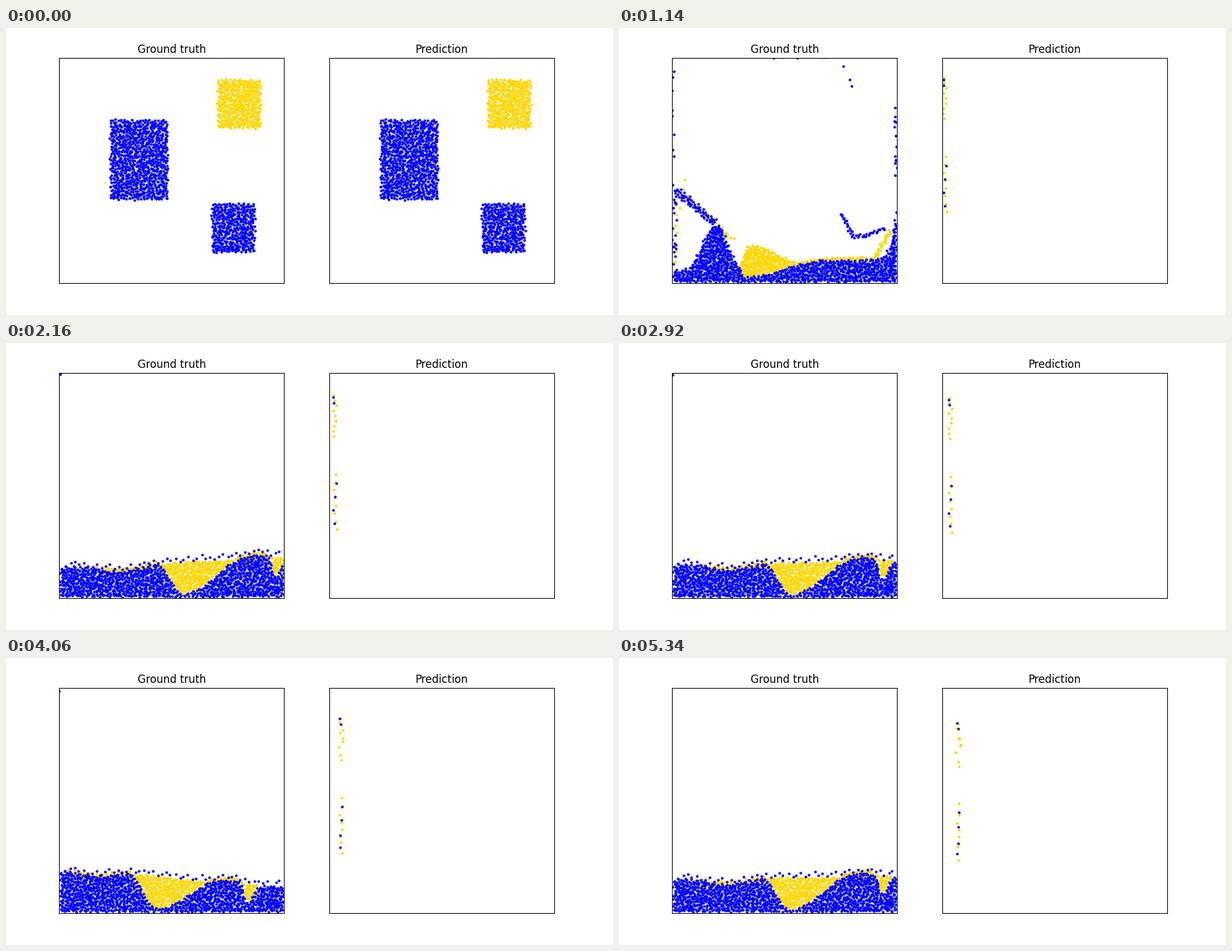
A matplotlib script for the animation above (5380 ms loop, 950 by 450 pixels).

```python
import numpy as np
import matplotlib.pyplot as plt
from matplotlib.animation import FuncAnimation

W, H, DPI = 950, 450, 100
FRAMES, LOOP = 151, 5380
PHI = (5 ** 0.5 - 1) / 2
SIDE, GAP = 352.27, 422.73
LEFT, BOTTOM = 83.0, 50.36
X0, X1, FLOOR = 85, 434, 398


def hump(d, left, right):
    """Raised cosine, 1 at d = 0, with its own reach on each side."""
    r = np.clip(np.where(d < 0, d / left, d / right), -1, 1)
    return 0.5 + 0.5 * np.cos(np.pi * r)


# Shapes map unit coordinates (u, v) to stage pixels, y pointing down.

def pool(x0, x1, top, bottom=FLOOR):
    """Even fill between two levels, each a number or a function of x."""
    def level(y, x):
        return y(x) if callable(y) else np.full_like(x, y)

    grid = np.linspace(x0, x1, 300)
    area = np.cumsum(np.maximum(level(bottom, grid) - level(top, grid), 0.1))
    area -= area[0]

    def shape(u, v):
        x = np.interp(u * area[-1], area, grid)
        a, b = level(top, x), level(bottom, x)
        return np.column_stack([x, a + (b - a) * v])
    return shape


def ribbon(width, *points, clumps=0):
    """Band along a polyline, optionally bunched into clumps."""
    p = np.array(points, float)
    step = np.diff(p, axis=0)
    size = np.hypot(*step.T)
    s = np.concatenate([[0], np.cumsum(size)])

    def shape(u, v):
        if clumps:
            w = 2 * np.pi * clumps
            u = u + 0.9 * np.sin(w * u) / w
        d = u * s[-1]
        k = np.clip(np.searchsorted(s, d) - 1, 0, len(size) - 1)
        normal = np.column_stack([-step[k, 1], step[k, 0]]) / size[k, None]
        mid = np.column_stack([np.interp(d, s, p[:, 0]), np.interp(d, s, p[:, 1])])
        return mid + normal * ((v - 0.5) * width)[:, None]
    return shape


def layout(*parts):
    """Spread consecutive runs of particles over (count, shape) parts."""
    out, i = [], 0
    for n, shape in parts:
        k = np.arange(i, i + n)
        out.append(shape((k - i + 0.5) / n, k * PHI % 1))
        i += n
    return np.vstack(out) + np.random.default_rng(5).uniform(-1.5, 1.5, (i, 2))


def track(times, keys):
    """Smooth interpolation through key poses without overshoot."""
    t, p = np.array(times, float), np.stack(keys)
    d = np.diff(p, axis=0) / np.diff(t)[:, None, None]
    prod, total = d[:-1] * d[1:], d[:-1] + d[1:]
    same = prod > 0
    inner = np.where(same, 2 * prod / np.where(same, total, 1), 0)
    m = np.concatenate([d[:1], inner, d[-1:]])

    def at(f):
        k = min(np.searchsorted(t, f, "right") - 1, len(t) - 2)
        h = t[k + 1] - t[k]
        s = (f - t[k]) / h
        return ((1 + 2 * s) * (1 - s) ** 2 * p[k] + s * (1 - s) ** 2 * h * m[k]
                + s * s * (3 - 2 * s) * p[k + 1] + s * s * (s - 1) * h * m[k + 1])
    return at


# Ground truth: three falling blocks, a splash, then slow sloshing.

blue_start = layout((900, pool(163, 253, 144, 269)), (420, pool(322, 389, 275, 352)))
gold_start = layout((430, pool(331, 398, 81, 157)))


def blue_impact():
    surface = lambda x: FLOOR - 10 - 140 * ((x - 325) / 109) ** 3
    return layout((900, pool(90, 184, 212, 342)),
                  (360, pool(325, X1, surface)),
                  (60, ribbon(5, (432, 290), (433, 140))))


def blue_climb():
    left = lambda x: FLOOR - 218 * np.exp((X0 - x) / 42)
    right = lambda x: FLOOR - 5 - 70 * ((x - 208) / 226) ** 6
    return layout((14, ribbon(2, (85, 60), (86, 190))),
                  (800, pool(X0, 198, left)),
                  (76, ribbon(14, (192, 388), (212, 375), (250, 336))),
                  (10, ribbon(5, (238, 332), (227, 296), (222, 284))),
                  (340, pool(208, X1, right)),
                  (70, ribbon(5, (432, 335), (433, 75), clumps=6)),
                  (10, ribbon(1, (428, 48), (300, 47), clumps=3)))


def splash_bed(x):
    s = np.clip((x - 200) / 120, 0, 1)
    return FLOOR - 8 - 26 * s * s * (3 - 2 * s) - 80 * np.exp((x - X1) / 8)


def blue_splash():
    mound = lambda x: FLOOR - 18 - 72 * hump(x - 152, 65, 55) ** 2
    return layout((8, ribbon(2, (84, 49), (85, 218), clumps=3)),
                  (22, ribbon(6, (87, 240), (87, 375), clumps=2)),
                  (60, ribbon(11, (88, 254), (110, 272), (150, 306))),
                  (520, pool(X0, 192, mound)),
                  (648, pool(192, X1, splash_bed)),
                  (40, ribbon(5, (347, 290), (366, 327), (388, 325), (416, 313))),
                  (14, ribbon(3, (433, 240), (433, 116), clumps=2)),
                  (8, ribbon(3, (371, 112), (348, 47), (222, 47), clumps=3)))


def gold_splat():
    lens = lambda x: 32 * np.sqrt(np.maximum(1 - ((x - 215) / 70) ** 2, 0))
    return layout((430, pool(145, 285, lambda x: 362 - lens(x), lambda x: 362 + lens(x))))


def gold_splash():
    top = lambda x: splash_bed(x) - 48 * hump(x - 205, 28, 90)
    return layout((10, ribbon(5, (89, 372), (90, 300), (103, 232))),
                  (25, ribbon(6, (105, 264), (145, 298), (178, 334))),
                  (310, pool(178, 292, top, splash_bed)),
                  (85, ribbon(6, (285, 369), (320, 363), (400, 361), (424, 318))))


def settled(f):
    """Blue and gold poses of the sloshing bed."""
    tilt = 10.2 * np.cos(2 * np.pi * (f - 66) / 100) - 3
    c = 252 + 2.2 * tilt + 12

    def surface(x):
        return (345 + tilt * np.cos(np.pi * (x - LEFT) / SIDE)
                + 8 * hump(x - c + 100, 70, 70) - 6 * hump(x - c - 115, 50, 50))

    pocket = lambda x: surface(x) + 50 * hump(x - c, 45, 95)
    dent = lambda x: surface(x) + 30 * hump(x - c - 142, 12, 20)
    bed = lambda x: pocket(x) + dent(x) - surface(x)
    above = lambda dy: lambda x: surface(x) - dy

    corner = (84 - (f - 61) * 0.04, 48 + (f - 61) * 0.05)
    blue = layout((1, ribbon(0, corner, (corner[0], corner[1] + 1))),
                  (1269, pool(X0, X1, bed)),
                  (50, pool(90, 432, above(9), above(1))))
    gold = layout((50, pool(max(90, c - 140), c - 40, above(4), above(-3))),
                  (310, pool(c - 45, c + 92, surface, pocket)),
                  (30, pool(c + 85, c + 130, above(4), above(-3))),
                  (40, pool(c + 130, c + 161, surface, dent)))
    return blue, gold


flight = [0, 6, 11, 16, 20]
calm = [61, 82, 98, 114, 132, 150]
blue_calm, gold_calm = zip(*map(settled, calm))
gold_flight = [gold_start + (-6.7 * f, 0.6 * f * f - 1.1 * f) for f in flight]

# Prediction: blocks fly out, a few particles linger at the left wall.


def gold_fly(dx):
    q = gold_start - (364.5, 119)
    taper = 1.55 - 0.5 * np.clip(q[:, 1] / 39, 0, 1) ** 3
    return np.column_stack([616 + dx + q[:, 0] * taper, 92 + q[:, 1] * 1.55])


def blue_fly(dx, wall):
    return layout((847, pool(370 - dx, 500 - dx, -30, 150)),
                  (45, ribbon(5, (509 - dx, 22), (508 - dx, 130))),
                  (8, ribbon(2, (507 - dx, 130), (507 - dx, 275))),
                  (42, ribbon(8, (853 + wall, 48), (856 + wall, 285), clumps=4)),
                  (378, pool(865 + dx, 935 + dx, 40, 280)))


def linger(keys, picks, y, seed):
    """Add later poses where the picked particles drift off the wall."""
    rng = np.random.default_rng(seed)
    early, mid, late = (keys[-1].copy() for _ in range(3))
    n = len(picks)
    mid[picks] = np.column_stack([rng.uniform(512, 518, n), y])
    early[picks] = mid[picks] - (5, 4)
    late[picks] = mid[picks] + rng.uniform((13, 15), (20, 30), (n, 2))
    return track((0, 16, 32, 61, 150), [*keys[:-1], early, mid, late])


shift = (GAP, 0)
gold_y = [*np.linspace(82, 146, 9), *np.linspace(206, 292, 8)]
blue_y = [*np.linspace(85, 94, 2), *np.linspace(220, 283, 4)]
tracks = [
    track([*flight, 24, 32, *calm], [*gold_flight, gold_splat(), gold_splash(), *gold_calm]),
    track([0, 8, 16, 32, *calm],
          [blue_start, blue_impact(), blue_climb(), blue_splash(), *blue_calm]),
    linger([gold_start + shift, gold_fly(0), gold_fly(-175)], np.arange(17) * 25, gold_y, 2),
    linger([blue_start + shift, blue_fly(0, 0), blue_fly(150, 16)],
           np.arange(894, 900), blue_y, 3),
]

fig = plt.figure(figsize=(W / DPI, H / DPI), dpi=DPI, facecolor="white")
dots = []
for title, x in (("Ground truth", LEFT), ("Prediction", LEFT + GAP)):
    ax = fig.add_axes([x / W, BOTTOM / H, SIDE / W, SIDE / H])
    ax.set(xlim=(x, x + SIDE), ylim=(H - BOTTOM, H - BOTTOM - SIDE), xticks=[], yticks=[])
    ax.set_title(title, fontsize=12, fontfamily="DejaVu Sans")
    for color in ("gold", "blue"):
        dots += ax.plot([], [], "o", ms=2, color=color)


def draw(f):
    for line, at in zip(dots, tracks):
        line.set_data(*at(f).T)
    return dots


anim = FuncAnimation(fig, draw, frames=FRAMES, interval=LOOP / FRAMES,
                     repeat=True, repeat_delay=0, blit=False)
plt.show()
```
